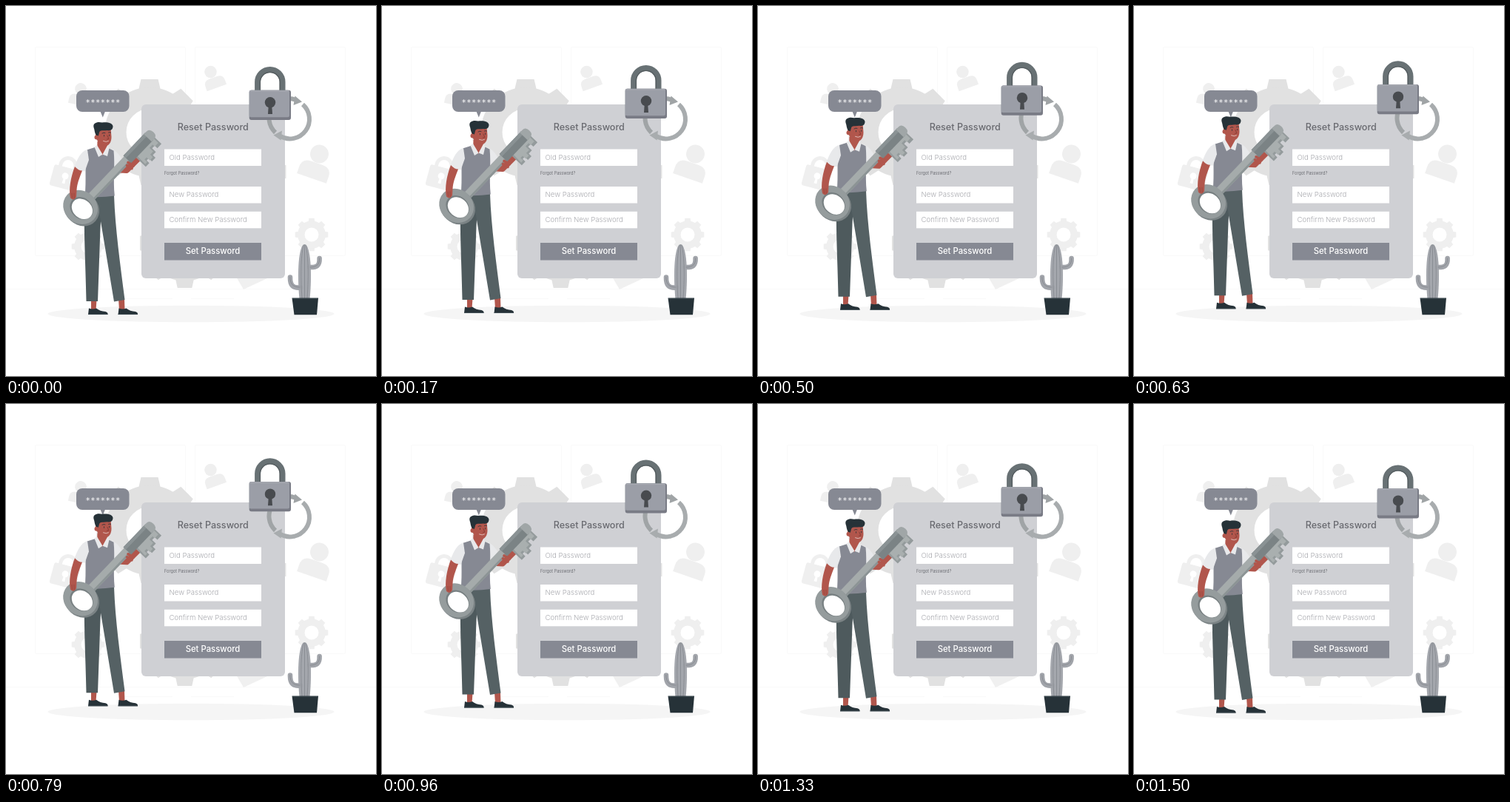
These frames come from a looping animation (500 px wide and 500 px high, 1.54 s). An HTML page:

```html
<!DOCTYPE html>
<html lang="en">
<head>
<meta charset="utf-8">
<title>Reset Password</title>
<style>
  html, body { margin: 0; height: 100%; overflow: hidden; background: #fff; }
  svg { display: block; width: 100vw; height: 100vh; }
  text { font-family: Inter, sans-serif; }
  .field { fill: #fff; }
  .hint { fill: #a9aaaf; font-size: 9.6px; font-weight: 300; }
  .skin { fill: #b1564c; }
  .skinLine { stroke: #b1564c; }
  .cloth { fill: #e8e9eb; }
  .dark { fill: #263238; }
  .line { fill: none; stroke-linecap: round; stroke-linejoin: round; }
</style>
</head>
<body>
<svg viewBox="0 0 500 500">
  <g fill="none" stroke="#f9f9f9">
    <rect x="39.500" y="55.500" width="203" height="282" rx="2"/>
    <rect x="255.500" y="55.500" width="203" height="282" rx="2"/>
    <path d="M0 382.500H500M155 395.500H225M250 395.500H308"/>
  </g>

  <g id="gears"></g>
  <path fill="#e4e4e4" d="M370 215h8.500v18H370z"/>
  <path fill="#f0f0f0" d="M311 366L321 383L353 368z"/>
  <g fill="#efefef">
    <g id="person" transform="translate(276.500 89) rotate(-20)">
      <circle r="8.300"/>
      <path d="M-13.500 23V17Q-13.500 8.500 -5 8.500H6Q14.500 8.500 14.500 17V23z"/>
    </g>
    <use href="#person" transform="translate(423.500 200) rotate(39) scale(1.500) translate(-276.500 -89)"/>
    <use href="#person" transform="translate(101 112) rotate(32) scale(.95) translate(-276.500 -89)"/>
    <g transform="translate(80 230) rotate(15)">
      <rect x="-18" y="-12" width="36" height="29" rx="3"/>
      <path d="M-10 -11V-15A10 10 0 0 1 10 -15V-11" fill="none" stroke="#efefef" stroke-width="5"/>
      <path fill="#fff" d="M-2 10L-1.500 4A4.500 4.500 0 1 1 1.500 4L2 10z"/>
    </g>
  </g>
  <ellipse cx="250" cy="416" rx="193.500" ry="11.300" fill="#f5f5f5"/>

  <rect x="183" y="133" width="194" height="235" rx="6" fill="#cfd0d4"/>
  <g class="field">
    <rect x="214" y="193.500" width="131" height="22.500"/>
    <rect x="214" y="244" width="131" height="22.500"/>
    <rect x="214" y="277.800" width="131" height="22.500"/>
  </g>
  <rect x="214" y="320" width="131" height="23.500" fill="#868993"/>
  <text x="279.800" y="168.300" text-anchor="middle" font-size="12.600" font-weight="500" fill="#696a70">Reset Password</text>
  <text class="hint" x="220.500" y="208">Old Password</text>
  <text x="214" y="228.200" font-size="5.600" fill="#6b6c72">Forgot Password?</text>
  <text class="hint" x="220.500" y="258.300">New Password</text>
  <text class="hint" x="220.500" y="292">Confirm New Password</text>
  <text x="279.500" y="335.200" text-anchor="middle" font-size="11.300" font-weight="500" fill="#fff">Set Password</text>

  <g fill="none" stroke-width="6">
    <path stroke="#a0a4a6" d="M364 171A26.500 26.500 0 0 1 392 127"/>
    <path stroke="#a8acae" d="M401 133A26.500 26.500 0 0 1 370 175.700"/>
  </g>
  <path fill="#a0a4a6" d="M390.500 121.500L400 129.500L388.500 134z"/>
  <path fill="#a8acae" d="M361.500 174.500L373 168.500L371.500 181.500z"/>

  <g id="lock">
    <path d="M340.100 116V102.700A16.700 16.700 0 0 1 373.500 102.700V116" fill="none" stroke="#687174" stroke-width="8"/>
    <path d="M343.300 116V103A13.500 13.500 0 0 1 370.300 103V116" fill="none" stroke="#555d60" stroke-width="1.300"/>
    <rect x="328.700" y="113.700" width="56.300" height="40.300" rx="3" fill="#797b85"/>
    <rect x="328.700" y="113.700" width="54.300" height="36.500" rx="2.500" fill="#9b9ea7"/>
    <path class="line" d="M330 115H382" stroke="#a9abb3"/>
    <circle cx="357" cy="130.300" r="7.200" fill="#484b4f"/>
    <path fill="#484b4f" d="M354.800 134H359.200L360 146H354z"/>
  </g>

  <path fill="#a4a7ad" d="M396.500 396C393 360 395.500 322 403.500 322S414 360 410.500 396z"/>
  <g class="line" stroke="#a1a4aa" stroke-width="6.600">
    <path d="M398 380.500C388 381.500 383.800 378 384 366.500"/>
    <path d="M410 353C420 353.500 424 351 423.600 341"/>
  </g>
  <g class="line" stroke="#83878d" stroke-width=".8">
    <path d="M400 395C397.500 360 399 335 402 323M403.500 395V323M407 395C409.500 360 408 335 405 323"/>
    <path d="M397 380C388 380 384 376 383.800 366M411 353C420 353 424 349 423.600 341"/>
  </g>
  <path class="dark" d="M386.500 394.500H422L420 417.300H389.500z"/>
  <path fill="#37454b" d="M387 395H421.700V396H387z"/>

  <rect x="95" y="114" width="71.500" height="29" rx="8" fill="#868993"/>
  <path fill="#868993" d="M127.500 142.500H134L130.800 150.500z"/>
  <text x="130.800" y="134.400" text-anchor="middle" fill="#fff" font-size="11.200" style="font-family:'DejaVu Sans Mono',monospace">*******</text>

  <g id="man">
    <!-- legs and shoes -->
    <path class="skin" d="M115 397H122.500L121.500 411H115zM152 396H160L160.500 411H153z"/>
    <g id="shoe">
      <path class="dark" d="M112 408.500Q117 410.500 122 408.500Q127 412.500 134.500 413Q138 414 137.500 417H111z"/>
      <path d="M111 416.600H137.600" stroke="#455258" stroke-width=".8"/>
    </g>
    <use href="#shoe" x="40.500"/>
    <path fill="#4e5a5d" d="M106.500 256H130L127.500 300L124 399H108.500C107.500 345 104.500 300 106.500 256z"/>
    <path fill="#556164" d="M120 256H146C147.500 300 154.500 350 160.500 397L146 399.500L127 285z"/>

    <!-- torso -->
    <path class="skin" d="M123.500 183H137V198L130 202L123 197z"/>
    <path class="cloth" d="M143 193C151 197 156 204 159 213L150 222L143 213z"/>
    <path fill="#868993" d="M109 194.500L120 191L130 202L137 191.500L145.500 195.500C147.500 215 144.500 235 146.800 256.500Q127 259.500 106.500 257.500C109 235 106 215 109 194.500z"/>
    <path class="cloth" d="M119.500 190.500L123 188L130.500 200.500L125 204zM137 188.500L139.500 192L137 203L130.500 200.500z"/>
    <path class="cloth" d="M110 194C101 196.500 97 206 92.500 217Q98 223.500 106.500 223.500L112 208z"/>

    <!-- head -->
    <path class="skin" d="M121 165H141.500L142.500 177C142.500 185 138.500 189.500 133.500 189C126.500 188.500 122.500 182 121 174z"/>
    <circle class="skin" cx="122.500" cy="177.500" r="3"/>
    <path class="dark" d="M118.500 164C117 157.500 124 156 130 157.500C137 156.500 144 158 144.500 162.500C144.500 166.500 142 169 137 168C131 169 127 167 126 171L124.800 175.500L121.800 174.500C119.500 171 120 168 118.500 164z"/>
    <g class="line" stroke="#263238" stroke-width=".8">
      <path d="M130 172Q132 170.500 134 171.500M138.500 171Q140 170.200 141.500 171"/>
      <path d="M132.500 174.500V176M139.700 174V175.500"/>
    </g>
    <path class="line" d="M137 175L138.800 179.500L136.500 180" stroke="#7e362f" stroke-width=".8"/>
    <path class="line" d="M131.500 182.500Q135.500 184.500 138.500 182.500" stroke="#e9d3d0" stroke-width=".8"/>

    <!-- far forearm -->
    <path class="line skinLine" d="M155 221.500L163 222L178 207" stroke-width="8"/>

    <!-- key -->
    <g transform="translate(101 273) rotate(-46.300)">
      <path fill="#949b9c" d="M104 2H138V19H130V14H125V21H119V26H112V20H108V25H101V5z"/>
      <path fill="#a9afaf" d="M104 2H136V15H129V11H123V18H117V23H111V17H107V22H103z"/>
      <path fill="#a5abab" d="M16 -5.800H105V5.800H16z"/>
      <path fill="#8c9495" d="M16 3H105V5.800H16z"/>
      <path fill="#7b8385" d="M91 -7.300H134V7.300H91z"/>
      <path fill="#8a9294" d="M91 -7.300H134V-2.500H91z"/>
      <path fill="#a0a6a7" d="M131 -7.300H136Q142 -7.300 142 0T136 7.300H131z"/>
    </g>
    <ellipse cx="102.300" cy="274" rx="25" ry="22" transform="rotate(42 102.300 274)" fill="#7b8385"/>
    <ellipse cx="100.600" cy="271.900" rx="24.500" ry="22" transform="rotate(42 100.600 271.900)" fill="#959c9d"/>
    <ellipse cx="102" cy="273.300" rx="16.800" ry="14" transform="rotate(42 102 273.300)" fill="#788082"/>
    <ellipse cx="102.900" cy="274.200" rx="15.300" ry="12.500" transform="rotate(42 102.900 274.200)" fill="#fff"/>

    <!-- fingers and near arm -->
    <path class="line skinLine" d="M165 211.500L172 216M163.500 215.500L170 219.500" stroke-width="3.600"/>
    <path class="skin" d="M93 217Q98 222.500 103 222.500C99 233 96 240 95.500 249L95 258Q92 264 87 259.500C84.500 248 87.500 231 93 217z"/>
    <path class="line" d="M89 253L89.500 259M92 253L92.200 259.500" stroke="#8c3f37" stroke-width=".6"/>
  </g>
</svg>
<script>
const $ = id => document.getElementById(id);

// Disc with eight tapered teeth and a round hole.
function gear(x, y, radius, hole, color) {
  const inner = radius * .845, w = radius * .18;
  let teeth = '';
  for (let a = 0; a < 360; a += 45)
    teeth += `<path transform="rotate(${a})" d="M${-w * 1.15} ${-inner + 3}L${-w * .9} ${-radius}H${w * .9}L${w * 1.15} ${-inner + 3}z"/>`;
  return `<g transform="translate(${x} ${y})" fill="${color}">${teeth}
    <circle r="${(inner + hole) / 2}" fill="none" stroke="${color}" stroke-width="${inner - hole}"/></g>`;
}
$('gears').innerHTML =
  gear(194, 170.500, 71.500, 31.500, '#e1e1e1') +
  gear(241.500, 320.500, 60.500, 26, '#e1e1e1') +
  gear(413, 309, 22.300, 9.500, '#efefef') +
  gear(111, 325, 22.300, 9.500, '#efefef');

const LOOP = 1540, STEP = 41.62, TOP = 18;

function draw(now) {
  const step = Math.floor((now % LOOP + 3) / STEP);
  const lift = step < TOP ? step * 9.2 / TOP : 9.2 - (step - TOP) * 9.6 / TOP;
  for (const id of ['man', 'lock'])
    $(id).setAttribute('transform', `translate(0 ${-lift})`);
}

const start = performance.now();
function tick() {
  draw(performance.now() - start);
  requestAnimationFrame(tick);
}
tick();
</script>
</body>
</html>
```
